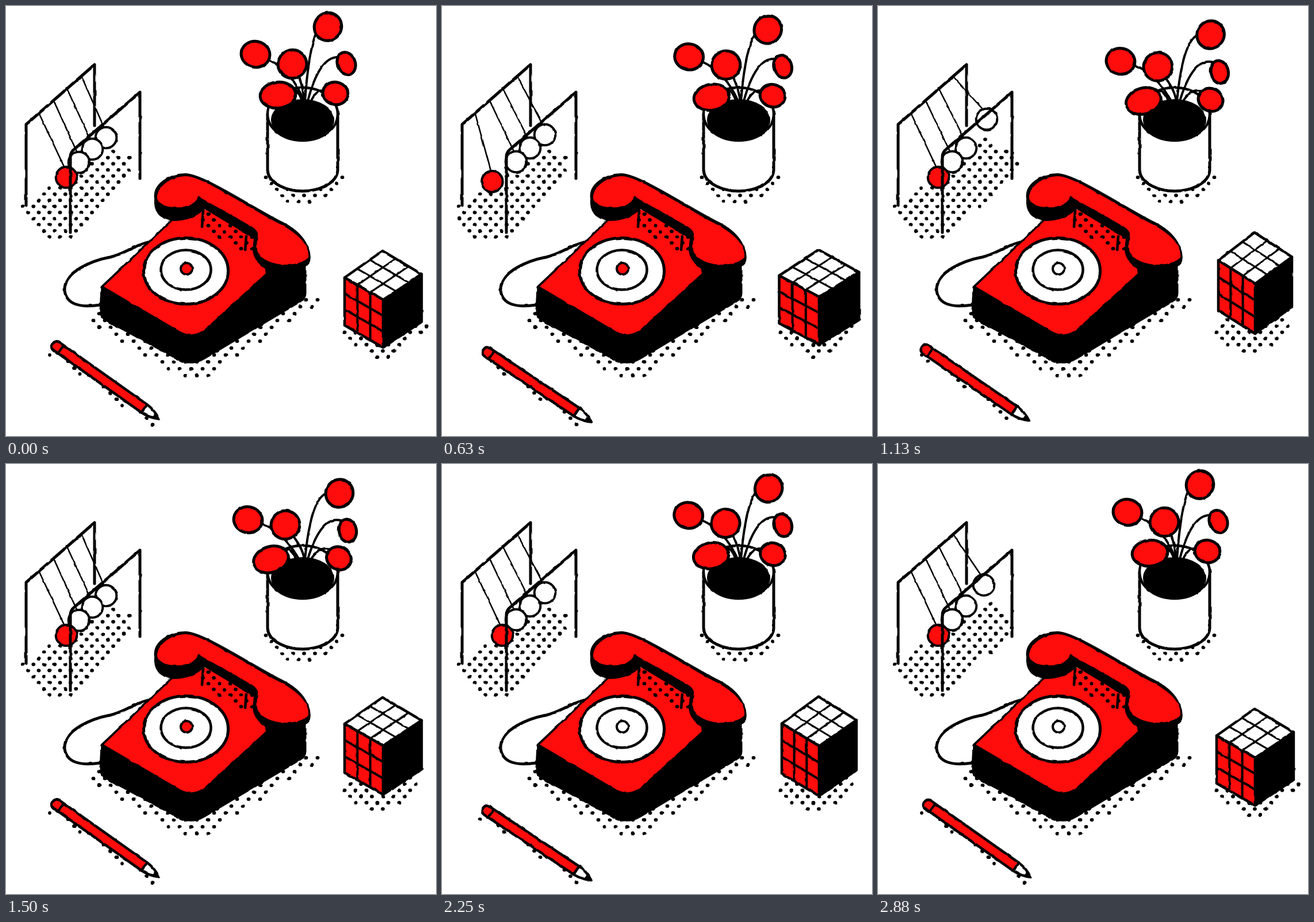
Write an HTML page with a canvas that moves like this. It is 748 px wide and 748 px high and loops after 3.01 s.

```html
<!DOCTYPE html>
<html>
<head>
<meta charset="utf-8">
<style>
  html, body { margin: 0; width: 100%; height: 100%; overflow: hidden; background: #fff; }
  canvas { display: block; filter: url(#rough); }
  svg { position: absolute; }
</style>
</head>
<body>
<svg width="0" height="0">
  <filter id="rough" x="0" y="0" width="1" height="1" color-interpolation-filters="sRGB">
    <feTurbulence type="fractalNoise" baseFrequency=".08" numOctaves="1" seed="4"/>
    <feDisplacementMap in="SourceGraphic" scale="3" xChannelSelector="R" yChannelSelector="G"/>
  </filter>
</svg>
<canvas id="stage" width="748" height="748"></canvas>
<script>
const ctx = document.getElementById('stage').getContext('2d');
const RED = '#ff0c0c', BLACK = '#000', WHITE = '#fff';
const LOOP = 3010, STEP = 125, STEPS = 24;
const { PI, sin, cos, min, floor, atan2 } = Math;

ctx.lineCap = ctx.lineJoin = 'round';

function paint(path, fill, width = 5) {
  if (fill) { ctx.fillStyle = fill; ctx.fill(path); }
  if (width) { ctx.lineWidth = width; ctx.stroke(path); }
}
const draw = (d, fill, width) => paint(new Path2D(d), fill, width);
const poly = pts => 'M' + pts.join('L') + 'Z';
const line = (a, b, width) => draw(`M${a}L${b}`, null, width);
const mix = (a, b, k) => a + (b - a) * k;
const mixPoint = (a, b, k) => a.map((v, n) => mix(v, b[n], k));

function oval(x, y, rx, ry, fill, width, angle = 0) {
  const path = new Path2D();
  path.ellipse(x, y, rx, ry, angle, 0, 2 * PI);
  paint(path, fill, width);
}

// Fills an area with staggered halftone dots
function dots(d, x0, y0, x1, y1, dx = 19, dy = 11) {
  const area = new Path2D(d);
  for (let y = y0, row = 0; y <= y1; y += dy, row++)
    for (let x = x0 + (row % 2) * dx / 2; x <= x1; x += dx)
      if (ctx.isPointInPath(area, x, y)) oval(x, y, 3.4, 3.1, BLACK, 0);
}

function cradle(step) {
  const phase = step % 12;
  const swing = sin(PI * (phase % 6) / 6);
  const left = phase < 6 ? sin(swing * PI / 2) : 0, right = phase < 6 ? 0 : swing;
  const push = phase === 0 ? 1 : 0;

  dots(poly([[25 - 10 * left, 350 + 6 * left], [64, 320], [112, 290], [188 - 6 * right, 246 - 16 * right],
    [206 + 40 * right, 254 + 2 * right], [233 + 16 * right, 286], [112, 406], [100, 411], [78 - 20 * left, 405 + 6 * left],
    [40 - 15 * left, 378 + 2 * left]]),
    20, 232, 255, 414, 18.5, 10.6);
  draw('M35 347V206L154 102V208');

  const balls = [
    [[58, 188], [105 - 25 * left, 298 + 10.5 * left], RED],
    [[84, 167], [129 - 2 * push, 271 + push], WHITE],
    [[107, 146], [153 - 3 * push, 247 + 2 * push], WHITE],
    [[132, 124], [179 - 5 * push + 10 * right, 224 + 5 * push - 27 * right], WHITE]
  ];
  balls.forEach(([top, [x, y]]) => line(top, [x, y - 10], 2.6));
  balls.reverse().forEach(([, [x, y], fill]) => oval(x, y, 18.3, 18.3, fill, 4));
  draw('M112 394V262Q112 254 120 248L233 150V300');
}

function plant(step) {
  const x = 1 - Math.abs(step - 11.7) / 11.7;
  const k = x < .5 ? 2.83 * x ** 2.5 : 1 - 2.83 * (1 - x) ** 2.5;
  const at = (x0, y0, x1, y1) => mixPoint([x0, y0], [x1, y1], k);

  dots('M446 293H586C584 328 550 345 516 345S448 328 446 293Z', 452, 298, 590, 345, 19, 10.5);
  draw('M455 188V286C457 310 490 322 516 322S575 310 577 286V188', WHITE);
  oval(516, 188, 61, 46, WHITE, 4.5);
  oval(516, 198, 55, 36, BLACK, 0);

  const stems = [
    [[520, 166], at(526, 80, 530, 62), at(540, 45, 557, 51)],
    [[525, 165], at(545, 88, 548, 90), at(578, 89, 582, 98)],
    [[530, 167], at(538, 148, 543, 145), at(550, 147, 560, 147)],
    [at(518, 166, 510, 166), at(500, 115, 480, 115), at(456, 93, 445, 104)],
    [[519, 168], [518, 150], at(510, 122, 500, 126)],
    [at(516, 168, 505, 168), at(508, 142, 500, 150), at(495, 143, 490, 148)]
  ];
  stems.forEach(([a, b, c]) => draw(`M${a}Q${b} ${c}`, null, 4));

  const flowers = [
    [at(560, 36, 580, 51), 23.5, 24.5, .6], [at(434, 84, 421, 97), 25, 22.5, .2],
    [at(498, 101, 486, 106), 25, 24.5, -.4], [at(592, 100, 594, 116), 15.5, 20, mix(-.35, -.2, k)],
    [at(473, 155, 461, 166), 31, 22.5, mix(-.1, -.3, k)], [at(573, 152, 579, 164), 22, 19.5, mix(.25, .5, k)]
  ];
  flowers.forEach(([[x, y], rx, ry, angle]) => oval(x, y, rx, ry, RED, 5, angle));
}

function phone(step) {
  dots('M139 526L150 552L300 642L322 650L350 647L548 514L524 494Z', 152, 499, 550, 650, 20, 12);
  draw('M247 411C215 420 205 432 180 437C155 442 100 460 102 495C105 520 130 525 164 520', WHITE);
  draw('M167 489L288 374L520 440V500Q520 508 510 514L345 612Q323 625 302 615L175 546Q165 541 165 530Z', BLACK);
  draw('M170 488L286 377Q292 371 325 345L440 395L452 465L346 562Q325 578 303 566Z', RED, 0);
  dots('M324 367L345 356L432 404L433 428L408 430Z', 333, 362, 435, 430, 19, 10);
  line([343, 355], [341, 384], 4.5);
  line([418, 400], [416, 424], 4.5);

  draw('M259 335C255 310 285 292 312 292C342 292 420 345 480 376C520 396 532 425 528 445C524 456 500 462 478 462C455 466 432 445 430 425L432 404L345 352Q325 373 290 373Q256 368 259 335Z', BLACK, 2);
  draw('M263 335C262 315 285 297 312 296C342 296 418 349 478 380C515 400 528 420 526 437C515 452 462 458 440 432Q434 424 438 400Q440 392 428 384L334 331Q332 345 305 350Q268 352 263 335Z', RED, 0);

  oval(313, 461, 73.5, 57.5, WHITE);
  oval(313, 459, 43.5, 34.5, WHITE, 4.5);
  oval(314, 457, 10, 10, step % 12 < 6 ? RED : WHITE, 4);
}

// step, half width, then heights of back, front and bottom corners
const cubeKeys = [
  [0, 67, 426, 511, 594], [3, 70, 431, 513, 594], [5, 69.5, 424, 506, 589], [9, 64, 394, 483, 570],
  [12, 67, 406, 490, 575], [16, 65, 400, 486, 574], [20, 65, 409, 495, 581], [23, 67, 426, 511, 594], [24, 67, 426, 511, 594]
];

function cube(step) {
  const next = cubeKeys.findIndex(key => key[0] > step);
  const a = cubeKeys[next - 1], b = cubeKeys[next];
  const [, w, top, front, bottom] = mixPoint(a, b, (step - a[0]) / (b[0] - a[0]));
  const mid = (top + front) / 2;
  const T = [655, top], L = [656 - w, mid + 4], R = [656 + w, mid - 2], F = [656, front];
  const drop = ([x, y]) => [x, y + bottom - front];
  const lift = min(1, (594 - bottom) / 12);

  dots(poly([[583, 556], [584, 576], [640, 610 - 3 * lift], [655, 618 - 6 * lift], [736 - 10 * lift, 560], [656, 500]]),
    589, 546, 740, 620, 19, 10.8);

  function face(a, b, c, d, fill, gridWidth) {
    draw(poly([a, b, c, d]), fill, 4.5);
    if (!gridWidth) return;
    for (const k of [1 / 3, 2 / 3]) {
      line(mixPoint(a, b, k), mixPoint(d, c, k), gridWidth);
      line(mixPoint(a, d, k), mixPoint(b, c, k), gridWidth);
    }
  }
  face(F, R, drop(R), drop(F), BLACK);
  face(T, R, F, L, WHITE, 3.2);
  face(L, F, drop(F), drop(L), RED, 4);
}

function pencil(step) {
  const k = (1 - cos(2 * PI * step / 12)) / 2;
  const [x, y] = mixPoint([88, 592], [78, 603], k);
  const [tx, ty] = mixPoint([267, 719], [261, 725], k);

  dots(poly([[x - 19, y + 12], [x, y], [tx - 15, ty - 10], [tx - 6, ty + 15], [tx - 32, ty + 2], [x + 30, y + 40]]),
    66, 596, 270, 744, 21, 11);
  ctx.save();
  ctx.translate(x, y);
  ctx.rotate(atan2(ty - y, tx - x));
  draw('M187 -8.5Q204 -8 218 0Q204 8 187 8.5Z', WHITE, 4.5);
  draw('M208 -4L219 0L208 4Z', BLACK, 3);
  draw('M0 -8.5H187V8.5H0Q-8 8 -8 0Q-8 -8 0 -8.5Z', RED, 4.5);
  line([9, -8], [9, 8], 4);
  ctx.restore();
}

let shown = -1;
function frame() {
  const step = min(STEPS - 1, floor(performance.now() % LOOP / STEP));
  if (step !== shown) {
    shown = step;
    ctx.fillStyle = WHITE;
    ctx.fillRect(0, 0, 748, 748);
    [cradle, plant, phone, cube, pencil].forEach(part => part(step));
  }
  requestAnimationFrame(frame);
}
frame();
</script>
</body>
</html>
```
